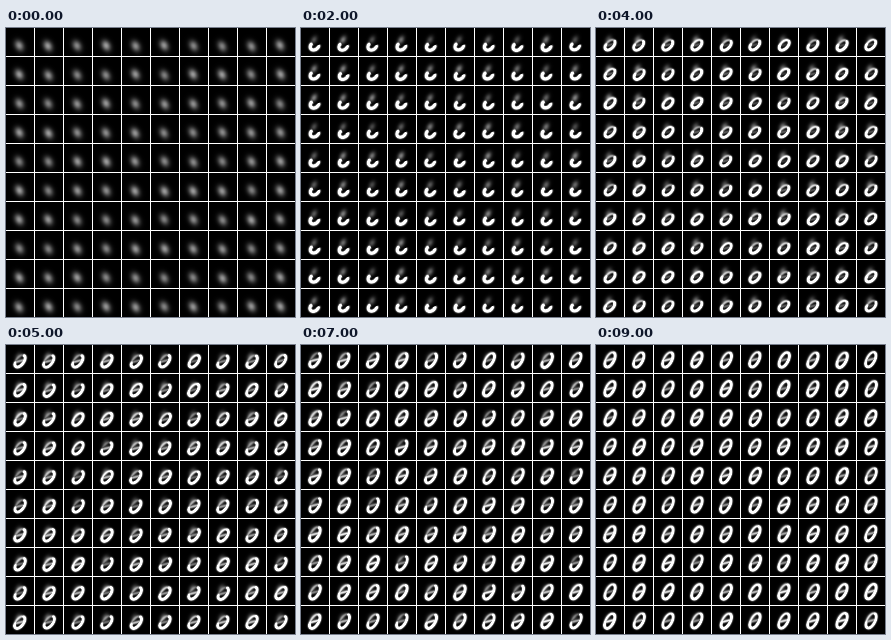
Animation, 289 px wide and 289 px high, one loop 10000 ms. Source, as an HTML page with a canvas:

```html
<!DOCTYPE html>
<html lang="en">
<head>
<meta charset="utf-8">
<title>Digit grid</title>
<style>
html, body { margin: 0; width: 100%; height: 100%; overflow: hidden; background: #000; }
canvas { display: block; width: 100%; height: 100%; }
</style>
</head>
<body>
<canvas id="stage" width="289" height="289"></canvas>
<script>
const CELL = 28, PITCH = 29, COUNT = 10, SIZE = 289, STEPS = 10, STEP_MS = 1000;
const ctx = document.getElementById('stage').getContext('2d');

const clamp = v => Math.max(0, Math.min(1, v));
const bell = v => Math.exp(-v * v);

// Seeded value from -1 to 1, fixed for each cell and trait.
function vary(cell, trait) {
  const v = Math.sin(cell * 12.9898 + trait * 78.233 + 4.1) * 43758.5453;
  return (v - Math.floor(v)) * 2 - 1;
}

function blobShader(cell) {
  const cx = 13.3 + vary(cell, 1) * .4, cy = 17.8 + vary(cell, 2) * .6;
  const level = .55 + vary(cell, 3) * .06;
  return (x, y) => level * bell((x - cx - (y - cy) * .2) / 4.4) * bell((y - cy) / 5.2);
}

// A slanted ring: first an open crescent, then closed, then stretched upwards
// while a bar grows across its middle.
function digitShader(cell, step) {
  const growth = clamp((step - 3) / 6);
  const top = step < 3 ? 12.9 + step * .7 : 7 + 8 * Math.exp((3 - step) / 2.2);
  const bottom = 22.1;
  const cx = 13.2 + Math.min(.8, (step - 1) * .3) + vary(cell, 1) * .3;
  const cy = (top + bottom) / 2 + vary(cell, 2) * .3;
  const rx = 4 + Math.min(.3, (step - 1) * .15), ry = (bottom - top) / 2;
  const slant = Math.min(.5, (step - 1) * .25) - growth * .13;
  const width = 1.6 - Math.min(.25, (step - 1) * .1) + vary(cell, 4) * .07;

  const gapAngle = Math.max(225, 325 - 20 * step) * Math.PI / 180;
  const gapLimit = Math.min(.75, .6 * step - .55);
  const gapDepth = step < 3 ? 1
    : clamp((.45 + .25 * Math.sin(growth * Math.PI)) * (1 + vary(cell, 5) * .3));

  const bar = Math.min(.85, growth * 2) * (.85 + vary(cell, 6) * .3);
  const mist = (step < 2 ? .26 : .38 - growth * .2) * (1 + vary(cell, 7) * .3);
  const mistX = 12 + 2 / step, mistY = 11.3 + 1.2 / step;

  return (x, y) => {
    const u = (x - cx + slant * (y - cy)) / rx, v = (y - cy) / ry;
    const r = Math.hypot(u, v) || .001;
    const gradX = u / r / rx, gradY = v / r / ry + slant * gradX;
    const distance = (r - 1) / Math.hypot(gradX, gradY);
    const gap = clamp((Math.cos(Math.atan2(v, u) - gapAngle) - gapLimit) * 2.5 + 1);
    const ring = 2 * (1 - gapDepth * gap) * bell(distance / width);
    const across = r < 1 ? bar * bell((y - cy + .25 * (x - cx)) / 1.5) : 0;
    const ink = clamp(Math.max(ring, across));
    const haze = mist * bell((x - mistX + (y - mistY) * .25) / 3.2) * bell((y - mistY) / 4);
    return ink + haze * (1 - ink);
  };
}

function render(step) {
  const image = ctx.createImageData(SIZE, SIZE);
  image.data.fill(255);
  for (let cell = 0; cell < COUNT * COUNT; cell++) {
    const left = cell % COUNT * PITCH, top = Math.floor(cell / COUNT) * PITCH;
    const shade = step ? digitShader(cell, step) : blobShader(cell);
    for (let y = 0; y < CELL; y++) for (let x = 0; x < CELL; x++) {
      const at = ((top + y) * SIZE + left + x) * 4;
      image.data.fill(shade(x + .5, y + .5) * 255, at, at + 3);
    }
  }
  return image;
}

const images = Array.from({ length: STEPS }, (_, step) => render(step));
const start = performance.now();
let shown = -1;

function draw() {
  const step = Math.floor((performance.now() - start) / STEP_MS) % STEPS;
  if (step !== shown) ctx.putImageData(images[shown = step], 0, 0);
  requestAnimationFrame(draw);
}
draw();
</script>
</body>
</html>
```
